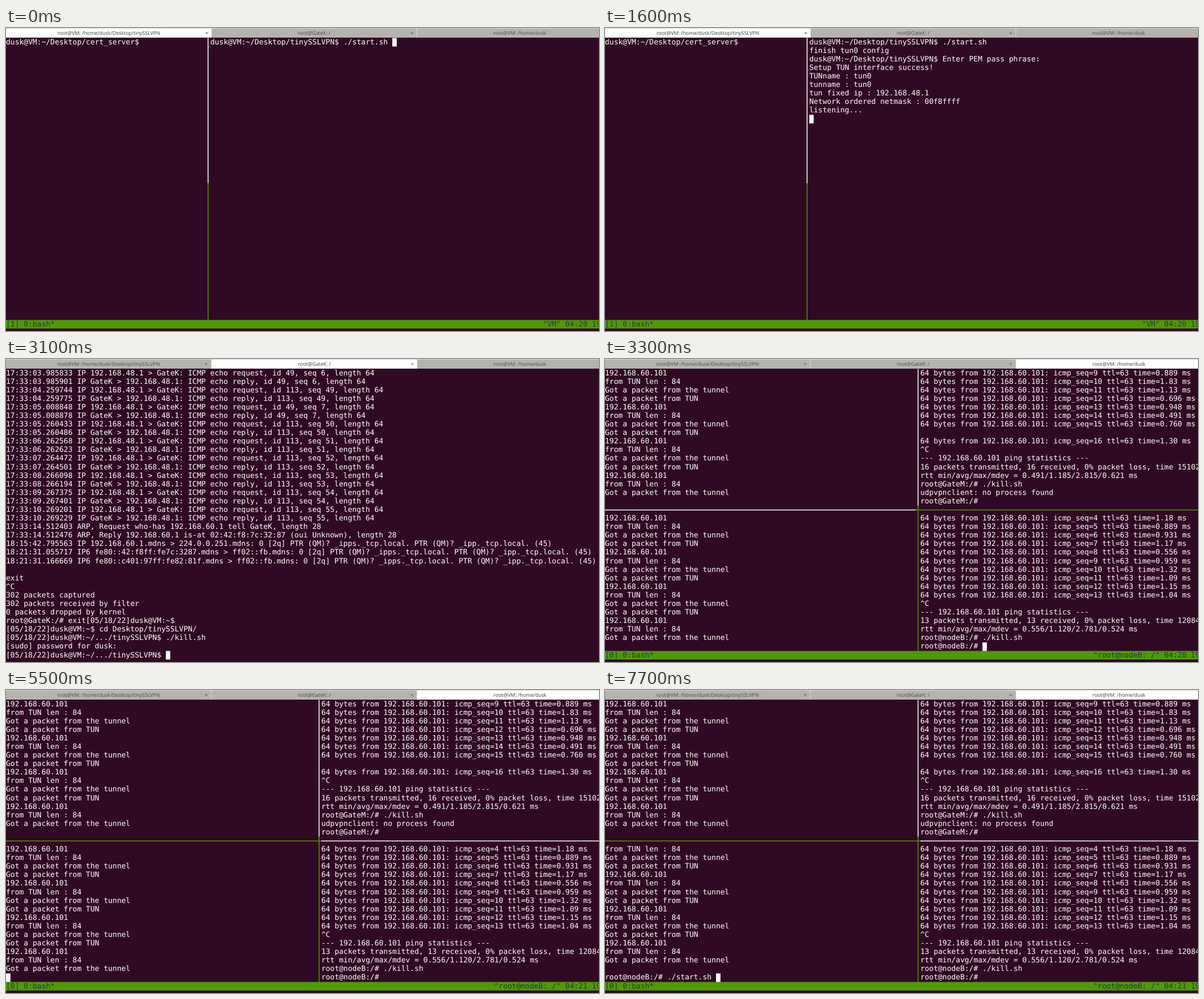
An HTML page that plays this animation: 1047 by 535 pixels, repeating every 8000 ms.

```html
<!DOCTYPE html>
<html lang="en">
<head>
<meta charset="utf-8">
<title>Terminal session</title>
<style>
html, body { margin: 0; width: 100%; height: 100%; overflow: hidden; background: #300a24; }
#stage { position: relative; width: 1047px; height: 535px; overflow: hidden; background: #300a24; }
#stage * { position: absolute; box-sizing: border-box; }
.line {
  color: #fff; white-space: pre; text-rendering: geometricPrecision;
  font: 13.022px/15px "DejaVu Sans Mono", monospace;
}
.status .line { color: #2e3436; }
svg { left: 0; top: 0; width: 1047px; height: 535px; }
.bar { left: 0; top: 0; width: 1047px; height: 17px; background: #dbd4cd; overflow: hidden; }
.tab {
  top: 1px; height: 16px; width: 362px; border-radius: 3px 3px 0 0;
  background: #b5b2af; color: #4d4b4a; text-align: center;
  font: 8.9px/16px "Open Sans", "Noto Sans", sans-serif; text-rendering: geometricPrecision;
}
.tab.on { background: #fff; color: #3a3a3a; width: 363px; }
.tab b { right: 6px; top: 0; font-weight: 400; }
</style>
</head>
<body>
<div id="stage"></div>
<script>
const CW = 7.84, CH = 15.09, TOP = 17.55, LOOP = 8000;
const WHITE = '#fff', GREEN = '#4e9a06';
const stage = document.getElementById('stage');
const rowY = row => TOP + row * CH;

function add(parent, tag, cls = '', text = '', style = {}) {
  const el = document.createElement(tag);
  el.className = cls;
  el.textContent = text;
  Object.assign(el.style, style);
  return parent.appendChild(el);
}

// A run of terminal rows starting at a cell; returns a function that rewrites it
function block(parent, col, row, lines = []) {
  const box = add(parent, 'div', '', '', { left: col * CW + 'px', top: 0 });
  const write = rows => {
    box.replaceChildren();
    rows.forEach((text, i) =>
      add(box, 'div', 'line', text, { top: Math.round(rowY(row + i)) + 'px' }));
  };
  write(lines);
  return write;
}

function setAttrs(el, attrs) {
  Object.entries(attrs).forEach(([k, v]) => el.setAttribute(k, v));
}

function svgLayer(parent) {
  return parent.appendChild(document.createElementNS('http://www.w3.org/2000/svg', 'svg'));
}

function rect(svg, x, y, width, height, fill) {
  const el = document.createElementNS(svg.namespaceURI, 'rect');
  setAttrs(el, { x, y, width, height, fill });
  return svg.appendChild(el);
}

const LINE = 1.5;
const vline = (svg, col, row1, row2, fill) =>
  rect(svg, (col + 0.5) * CW - LINE / 2, rowY(row1), LINE, (row2 - row1) * CH, fill);
const hline = (svg, row, col1, col2, fill) =>
  rect(svg, col1 * CW, rowY(row + 0.5) - LINE / 2, (col2 - col1) * CW, LINE, fill);

// Tab bar
const bar = add(stage, 'div', 'bar');
const tabs = ['root@VM: /home/dusk/Desktop/tinySSLVPN', 'root@GateK: /', 'root@VM: /home/dusk']
  .map((title, i) => {
    const tab = add(bar, 'div', 'tab', title, { left: i * 363 + 'px' });
    add(tab, 'b', '', '×');
    return tab;
  });
const scenes = tabs.map(() => add(stage, 'div', '', '', { left: 0, top: 0 }));

// Server scene
const server = scenes[0];
const prompt = 'dusk@VM:~/Desktop/';
const startLine = prompt + 'tinySSLVPN$ ./start.sh';
const serverLog = [
  startLine,
  'finish tun0 config',
  prompt + 'tinySSLVPN$ Enter PEM pass phrase:',
  'Setup TUN interface success!',
  'TUNname : tun0',
  'tunname : tun0',
  'tun fixed ip : 192.168.48.1',
  'Network ordered netmask : 00f8ffff',
  'listening...'
];
block(server, 0, 0, [prompt + 'cert_server$']);
const writeServer = block(server, 46, 0);
const serverLines = svgLayer(server);
vline(serverLines, 45, 0, 17, WHITE);
vline(serverLines, 45, 17, 33, GREEN);

// Packet capture scene
const echoes = [
  ['03.985833', '03.985901', 49, 6], ['04.259744', '04.259775', 113, 49],
  ['05.008848', '05.008878', 49, 7], ['05.260433', '05.260486', 113, 50],
  ['06.262568', '06.262623', 113, 51], ['07.264472', '07.264501', 113, 52],
  ['08.266098', '08.266194', 113, 53], ['09.267375', '09.267401', 113, 54],
  ['10.269201', '10.269229', 113, 55]
].flatMap(([sent, back, id, seq]) => [
  `17:33:${sent} IP 192.168.48.1 > GateK: ICMP echo request, id ${id}, seq ${seq}, length 64`,
  `17:33:${back} IP GateK > 192.168.48.1: ICMP echo reply, id ${id}, seq ${seq}, length 64`
]);
const mdns = '0 [2q] PTR (QM)? _ipps._tcp.local. PTR (QM)? _ipp._tcp.local. (45)';
block(scenes[1], 0, 0, [
  ...echoes,
  '17:33:14.512403 ARP, Request who-has 192.168.60.1 tell GateK, length 28',
  '17:33:14.512476 ARP, Reply 192.168.60.1 is-at 02:42:f8:7c:32:87 (oui Unknown), length 28',
  '18:15:42.795563 IP 192.168.60.1.mdns > 224.0.0.251.mdns: ' + mdns,
  '18:21:31.055717 IP6 fe80::42:f8ff:fe7c:3287.mdns > ff02::fb.mdns: ' + mdns,
  '18:21:31.166669 IP6 fe80::c401:97ff:fe82:81f.mdns > ff02::fb.mdns: ' + mdns,
  '',
  'exit',
  '^C',
  '302 packets captured',
  '302 packets received by filter',
  '0 packets dropped by kernel',
  'root@GateK:/# exit[05/18/22]dusk@VM:~$',
  '[05/18/22]dusk@VM:~$ cd Desktop/tinySSLVPN/',
  '[05/18/22]dusk@VM:~/.../tinySSLVPN$ ./kill.sh',
  '[sudo] password for dusk:',
  '[05/18/22]dusk@VM:~/.../tinySSLVPN$'
]);

// Client scene
const client = scenes[2];
const cycle = ['192.168.60.101', 'from TUN len : 84', 'Got a packet from the tunnel', 'Got a packet from TUN'];
const tunnel = Array.from({ length: 15 }, (_, i) => cycle[i % 4]);
const pings = (first, times) => times.split(' ').map((t, i) =>
  `64 bytes from 192.168.60.101: icmp_seq=${first + i} ttl=63 time=${t} ms`);
const summary = (n, total, rtt) => [
  '^C',
  '--- 192.168.60.101 ping statistics ---',
  `${n} packets transmitted, ${n} received, 0% packet loss, time ${total}ms`,
  `rtt min/avg/max/mdev = ${rtt} ms`
];
block(client, 0, 0, tunnel);
const writeClient = block(client, 0, 17);
block(client, 71, 0, [
  ...pings(9, '0.889 1.83 1.13 0.696 0.948 0.491 0.760'),
  '',
  ...pings(16, '1.30'),
  ...summary(16, 15102, '0.491/1.185/2.815/0.621'),
  'root@GateM:/# ./kill.sh',
  'udpvpnclient: no process found',
  'root@GateM:/#'
]);
block(client, 71, 17, [
  ...pings(4, '1.18 0.889 0.931 1.17 0.556 0.959 1.32 1.09 1.15 1.04'),
  ...summary(13, 12084, '0.556/1.120/2.781/0.524'),
  'root@nodeB:/# ./kill.sh',
  'root@nodeB:/#'
]);
const clientLines = svgLayer(client);
vline(clientLines, 70, 0, 16, WHITE);
vline(clientLines, 70, 16, 33, GREEN);
hline(clientLines, 16, 70, 71, GREEN);
const leftEdge = hline(clientLines, 16, 0, 70, WHITE);
const rightEdge = hline(clientLines, 16, 71, 134, GREEN);

// Status row and cursor
const status = add(stage, 'div', 'status', '', { left: 0, top: 0 });
rect(svgLayer(status), 0, rowY(33), 1047, CH, GREEN);
const writeStatus = block(status, 0, 33);
const cursor = rect(svgLayer(stage), 0, 0, CW, CH, WHITE);

// Each step changes part of the state; cur is [column, row]
const steps = [
  [0, { tab: 0, log: false, cur: [87, 0], blink: 1, hollow: false, clock: '04:20', left: false, typed: null }],
  [500, { log: true, cur: [46, 9] }],
  [1000, { blink: 0 }],
  [1600, { blink: 1 }],
  [2100, { blink: 0 }],
  [2700, { blink: 1 }],
  [3000, { hollow: true }],
  [3100, { tab: 1, hollow: false, cur: [36, 33] }],
  [3300, { tab: 2, cur: [85, 32] }],
  [3900, { blink: 0 }],
  [4400, { blink: 1 }],
  [4900, { blink: 0 }],
  [5100, { blink: 1 }],
  [5200, { clock: '04:21' }],
  [5500, { left: true, cur: [0, 32] }],
  [5900, { typed: '' }],
  [6300, { typed: '.' }],
  [6400, { typed: './' }],
  [6900, { blink: 0 }],
  [7100, { typed: './s', blink: 1 }],
  [7400, { typed: './st' }],
  [7500, { typed: './sta' }],
  [7700, { typed: './start.sh ' }]
];
let state = {};
const states = steps.map(([, change]) => (state = { ...state, ...change }));

function drawCursor([col, row], { blink, hollow }) {
  const inset = hollow ? 0.5 : 0;
  setAttrs(cursor, {
    x: col * CW + inset,
    y: rowY(row) + inset,
    width: CW - 2 * inset,
    height: CH - 2 * inset,
    fill: hollow ? 'none' : WHITE,
    stroke: hollow ? WHITE : 'none',
    visibility: blink ? 'visible' : 'hidden'
  });
}

function render(s) {
  tabs.forEach((tab, i) => {
    tab.classList.toggle('on', i === s.tab);
    scenes[i].style.display = i === s.tab ? '' : 'none';
  });
  writeServer(s.log ? serverLog : [startLine]);

  const shell = 'root@nodeB:/# ';
  const typing = s.typed !== null;
  writeClient(typing ? [...tunnel.slice(1), '', shell + s.typed] : tunnel);
  leftEdge.setAttribute('fill', s.left ? GREEN : WHITE);
  rightEdge.setAttribute('fill', s.left ? WHITE : GREEN);

  const onClient = s.tab === 2;
  const title = onClient ? '"root@nodeB: /"' : '"VM"';
  status.style.display = s.tab === 1 ? 'none' : '';
  writeStatus([`[${onClient ? 0 : 1}] 0:bash*` + `${title} ${s.clock} 19`.padStart(123)]);

  drawCursor(typing ? [shell.length + s.typed.length, 32] : s.cur, s);
}

const began = performance.now();
let shown = -1;
function tick() {
  const t = (performance.now() - began) % LOOP;
  const now = steps.findLastIndex(([at]) => at <= t);
  if (now !== shown) render(states[shown = now]);
  requestAnimationFrame(tick);
}
tick();
</script>
</body>
</html>
```
